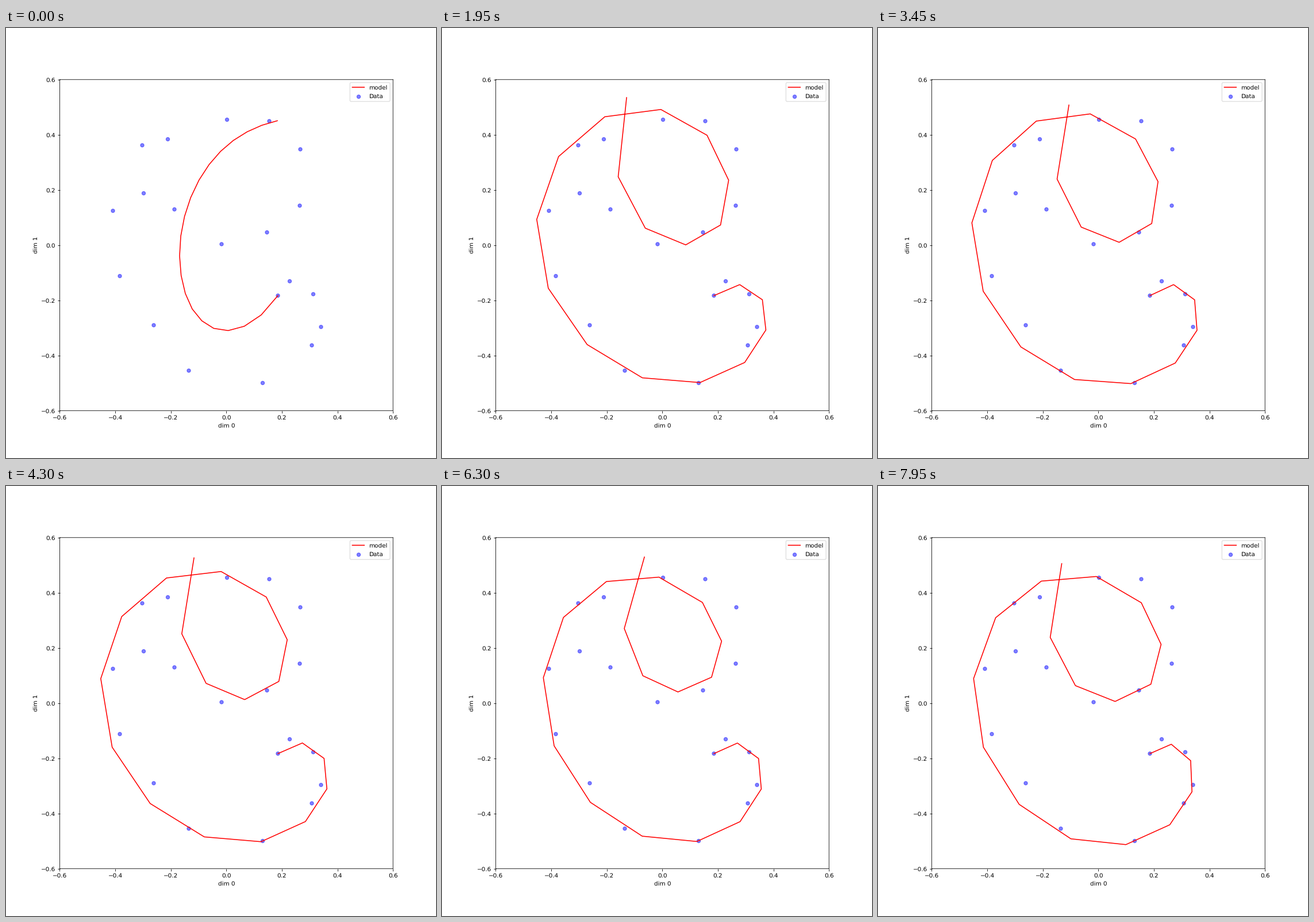
Recreate the animation shown at these times as a matplotlib script. Size 748x748 px, loop 8000 ms.

```python
import numpy as np
import matplotlib.pyplot as plt
from matplotlib.animation import FuncAnimation

plt.rcParams.update({"path.snap": False, "text.hinting": "none"})

SIZE, DPI = 748, 74.8
STEP, FRAMES = 50, 160
SETTLE = 900
START = 473 + 465.5j
EDGES = np.arange(19)


def to_axes(z):
    """Stage pixels, as complex numbers, to axis units."""
    x = (z.real / SIZE - 0.125) / 0.775 * 1.2 - 0.6
    y = (0.89 - z.imag / SIZE) / 0.77 * 1.2 - 0.6
    return x, y


def spline(x, y, at):
    """Cubic Hermite curve through the rows of y."""
    x, y, at = np.asarray(x), np.asarray(y), np.asarray(at)
    m = np.gradient(y, x, axis=0, edge_order=2)
    k = np.clip(np.searchsorted(x, at, side="right") - 1, 0, len(x) - 2)
    column = (-1,) + (1,) * (y.ndim - 1)
    h = (x[k + 1] - x[k]).reshape(column)
    s = (at - x[k]).reshape(column) / h
    a, b = y[k], y[k + 1]
    return (a + (b - a) * s * s * (3 - 2 * s)
            + h * s * (1 - s) * ((1 - s) * m[k] - s * m[k + 1]))


def edges(values):
    """One value per edge from a value at every second edge."""
    return spline(EDGES[::2], np.array(values, float), EDGES)


def walk(heading, length):
    steps = length * np.exp(1j * np.radians(heading))
    return START + np.concatenate([[0], np.cumsum(steps)])


# heading in degrees (clockwise from right) and length in pixels
arc_turn = edges([130.8, 165, 212.4, 246, 265.5, 280.8, 295.4, 311, 328, 343.7])
arc_len = edges([44.5, 29, 24.5, 29.6, 34.1, 34.6, 33.8, 30.5, 28.3, 28.1])
coil_turn = edges([-22.3, 83.8, 156, 212.2, 260.6, 320.4, 390, 464.5, 564, 639.9])
coil_len = edges([47.4, 53.4, 84.3, 111.5, 121.2, 102.5, 90, 73.5, 73.9, 136.5])

# drift of a few vertices of the coil as the fit wanders
DRIFT_AT = [0, 4, 9, 13, 16, 19]
DRIFT = {
    0: [0] * 6,
    900: [0, 10.5 - 5.5j, 8 + 11j, -18 - 8.5j, 10.5 - 23j, 26 + 30j],
    1950: [0, 2 - 2.5j, -3.5 + 2j, 3 - 7.5j, 12.5 + 8.5j, -5 + 5j],
    3450: [0, -7.5 - 1.5j, -5 + 8j, -10 - 1j, 8 + 4j, 6 + 18j],
    5150: [0] * 6,
    6300: [0, -6 - 0.5j, 8 + 2.5j, -5 + 8.5j, -1 - 10.5j, 26 + 7.5j],
    7950: [0, -17 + 5j, -2 + 4j, 9j, 1 + 6j, -6.5 + 19j],
}
drift = spline(list(DRIFT), np.array(list(DRIFT.values()), complex),
               np.arange(FRAMES) * STEP)


def curve(i):
    s = 1 - (1 - min(i * STEP / SETTLE, 1)) ** 2
    swell = 1 + 0.8 * np.sin(np.pi * s) * np.clip(1 - EDGES / 8, 0, 1)
    path = walk(arc_turn + (coil_turn - arc_turn) * s,
                (arc_len + (coil_len - arc_len) * s) * swell)
    return path + spline(DRIFT_AT, drift[i], np.arange(20))


data = np.array([
    START, 493.5 + 440.5j, 534.5 + 463j, 548 + 520j, 532 + 552j,
    446.5 + 617.5j, 318 + 596j, 257 + 517j, 198 + 431.5j, 186 + 318j,
    237 + 204j, 281.5 + 193.5j, 384.5 + 159.5j, 458 + 162j, 512 + 211j,
    511 + 309j, 454 + 355.5j, 375 + 376j, 293 + 315.5j, 239.5 + 287.5j])

fig, ax = plt.subplots(figsize=(SIZE / DPI, SIZE / DPI), dpi=DPI)
line, = ax.plot(*to_axes(curve(0)), color="red", label="model")
ax.scatter(*to_axes(data), s=np.full(len(data), 36), color=["blue"],
           alpha=0.5, label="Data")
ax.set(xlim=(-0.6, 0.6), ylim=(-0.6, 0.6), xlabel="dim 0", ylabel="dim 1")
ax.legend(loc="upper right")


def draw(i):
    line.set_data(*to_axes(curve(i)))
    return line,


anim = FuncAnimation(fig, draw, frames=FRAMES, interval=STEP,
                     repeat=True, repeat_delay=0)
plt.show()
```
